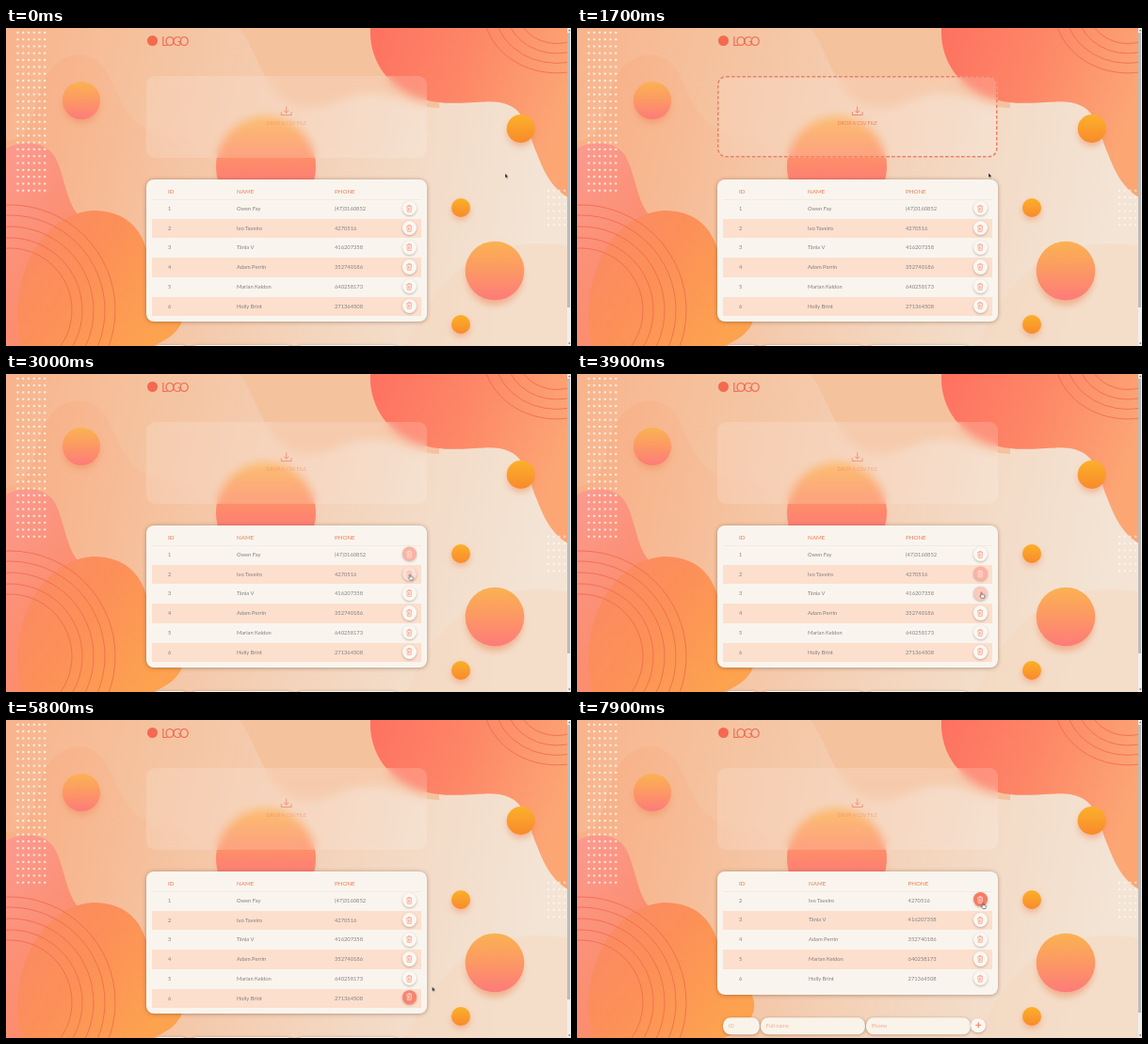
Animation, 600 px wide and 338 px high, one loop 8 s. Source, as an HTML page:

```html
<!DOCTYPE html>
<html lang="en">
<head>
<meta charset="utf-8">
<title>Contact list</title>
<style>
@property --hot { syntax: "<number>"; inherits: true; initial-value: 0; }
html, body { margin: 0; width: 100%; height: 100%; overflow: hidden; }
body {
  position: relative; background: #f3cdb0;
  font: 5.76px/20.7px Lato, sans-serif; color: #858080;
  --gone: 0; animation: gone 8s step-end infinite;
}
body * { position: absolute; box-sizing: border-box; }
svg * { position: static; }
svg { overflow: visible; fill: none; }
.bg { left: 0; top: 0; width: 600px; height: 338px; overflow: hidden; }
span { white-space: nowrap; }

.mark { left: 149.5px; top: 8px; width: 11px; height: 11px; border-radius: 50%; background: #f4694f; }
.logo { left: 165px; top: 3.5px; font-size: 13px; letter-spacing: -2.4px; color: #f0705a; }

.zone {
  left: 149px; top: 51px; width: 297.5px; height: 86.5px; border-radius: 9px;
  background: rgba(255, 250, 245, .17); backdrop-filter: blur(5px);
  color: #f07f66; animation: zone 8s linear infinite;
}
.zone svg { left: 0; top: 0; width: 100%; height: 100%; stroke: currentColor; }
.zone rect { stroke-width: 1.5; stroke-dasharray: 3.7 2; opacity: var(--hot); }
.zone path { opacity: calc(.8 + .2 * var(--hot)); }
.zone span { left: 0; width: 100%; top: 40px; text-align: center; font-size: 5.4px; opacity: calc(.5 + .5 * var(--hot)); }

.card {
  left: 149px; top: 161px; width: 297.5px; height: calc(151.2px - 20.7px * var(--gone));
  border-radius: 8px; background: #f9f5ee;
  box-shadow: 0 .5px 4px rgba(90, 50, 30, .45); overflow: hidden;
}
.line { left: 5.5px; top: 20.5px; width: 286px; height: .5px; background: #f5eae2; }
.head { top: 3px; font-size: 6.2px; color: #f27850; }
.slot { left: 5.5px; width: 286px; height: 20.7px; }
.slot:nth-child(even of .slot) { background: #fcdfcd; }
.row { left: 0; top: 0; }
.leaves { opacity: calc(1 - var(--gone)); }
.rest { left: 0; top: 0; transform: translateY(calc(-20.7px * var(--gone))); }
.id { left: 23px; }
.name { left: 96px; margin-left: calc(1px * var(--gone)); }
.phone { left: 200px; margin-left: calc(2.6px * var(--gone)); }

.btn {
  --lit: min(1, 2 * var(--hot));
  width: 15.2px; height: 15.2px; border-radius: 50%;
  box-shadow: 0 1px 2.5px rgba(90, 60, 45, .35);
  background: rgb(calc(251 - 2 * var(--hot)), calc(247 - 138 * var(--hot)), calc(242 - 158 * var(--hot)));
  color: rgb(calc(246 + 9 * var(--lit)), calc(158 + 75 * var(--lit)), calc(128 + 94 * var(--lit)));
}
.btn svg { left: 4.4px; top: 3.6px; width: 6.4px; height: 8px; stroke: currentColor; stroke-width: .7; }
.slot .btn { left: 266px; top: 2.3px; transform: translateY(calc(-1px * var(--hot))); }

.form { left: 0; top: 336.7px; transform: translateY(calc(-20.7px * var(--gone))); }
.form .btn { left: 418.4px; top: 1px; color: #f1805c; }
.field {
  height: 18px; line-height: 18px; border-radius: 8px; padding-left: 5.8px;
  background: #f9f3ea; color: #f5ad92; box-shadow: 0 .5px 3px rgba(90, 50, 30, .45);
}

.bar { right: 0; top: 0; width: 4.5px; height: 100%; background: #f1efee; }
.thumb { left: .7px; width: 3.1px; top: 5px; height: calc(292px + 14px * var(--gone)); background: #bdbbba; }
.bar svg { left: 0; top: 0; fill: #666; }

.cursor { left: 0; top: 0; animation: move 8s linear infinite, hand 8s step-end infinite; --hand: 0; }
.cursor svg { left: 0; top: 0; width: 6px; height: 8px; }
.arrow { opacity: calc(1 - var(--hand)); fill: #111; stroke: #fff; stroke-width: .4; }
.hand { opacity: var(--hand); fill: #fff; stroke: #222; stroke-width: .55; }

@keyframes gone { 0% { --gone: 0; } 95%, 100% { --gone: 1; } }
@keyframes zone { 0%, 10.6%, 25%, 100% { --hot: 0; } 13.75%, 21.25% { --hot: 1; } }
@keyframes hot1 {
  0%, 28%, 39.4%, 82.5%, 95% { --hot: 0; }
  31%, 35.6%, 86.25%, 94.99%, 100% { --hot: 1; }
  98.75% { --hot: .9; }
}
@keyframes hot2 { 0%, 36.9%, 50.6%, 100% { --hot: 0; } 40.6%, 46.9% { --hot: 1; } }
@keyframes hot3 { 0%, 47.5%, 56.9%, 100% { --hot: 0; } 51.2%, 53.1% { --hot: 1; } }
@keyframes hot4 { 0%, 53.7%, 63.1%, 100% { --hot: 0; } 57.5%, 59.4% { --hot: 1; } }
@keyframes hot5 { 0%, 61.9%, 68.1%, 100% { --hot: 0; } 65% { --hot: 1; } }
@keyframes hot6 { 0%, 65.6%, 75.6%, 100% { --hot: 0; } 68.7%, 71.9% { --hot: 1; } }
@keyframes hand {
  0%, 35.9%, 46.3%, 52.5%, 58%, 64.6%, 71% { --hand: 0; }
  28%, 36.9%, 47.5%, 54%, 61.2%, 66.2%, 82.5%, 100% { --hand: 1; }
}
@keyframes move {
  0%, 1.25% { transform: translate(530px, 154.5px); }
  10% { transform: translate(455px, 130px); }
  13.75%, 16.25% { transform: translate(425px, 112px); }
  21.25% { transform: translate(437px, 154px); }
  27.5% { transform: translate(429px, 184px); }
  33.75% { transform: translate(428.5px, 194px); }
  37.5% { transform: translate(428.5px, 212.5px); }
  45% { transform: translate(429px, 217px); }
  48.1% { transform: translate(429px, 230px); }
  52.5% { transform: translate(429px, 241px); }
  54.4% { transform: translate(429px, 249px); }
  57.5% { transform: translate(429px, 258px); }
  58.75% { transform: translate(429px, 264px); }
  62.5% { transform: translate(429px, 272px); }
  65% { transform: translate(429px, 284px); }
  66.9% { transform: translate(429px, 291px); }
  70% { transform: translate(431px, 297px); }
  71.25% { transform: translate(437px, 293px); }
  72.5% { transform: translate(452.5px, 283.5px); }
  77.5% { transform: translate(452px, 235px); }
  81.25% { transform: translate(437px, 199px); }
  83.75% { transform: translate(429px, 194px); }
  90%, 95% { transform: translate(428.5px, 194.5px); }
  98.75%, 100% { transform: translate(430.5px, 194px); }
}
</style>
</head>
<body>
<svg class="bg" viewBox="0 0 600 338">
  <defs>
    <linearGradient id="base" x2="1" y2=".12">
      <stop stop-color="#f8b48c"/><stop offset=".25" stop-color="#f5c29e"/>
      <stop offset=".5" stop-color="#f4cdb1"/><stop offset=".75" stop-color="#f3dac5"/>
      <stop offset="1" stop-color="#f3e4d5"/>
    </linearGradient>
    <linearGradient id="wave" x2="1" y2=".15">
      <stop stop-color="#f9a679"/><stop offset=".45" stop-color="#f7b791"/>
      <stop offset="1" stop-color="#f4cbae" stop-opacity="0"/>
    </linearGradient>
    <linearGradient id="red" x2="1" y2=".3">
      <stop stop-color="#fe7160"/><stop offset=".5" stop-color="#fd8767"/>
      <stop offset="1" stop-color="#fca674"/>
    </linearGradient>
    <linearGradient id="pink" x2=".7" y2="1">
      <stop stop-color="#fc9a90"/><stop offset=".45" stop-color="#fb9075"/>
      <stop offset="1" stop-color="#fc8a68"/>
    </linearGradient>
    <linearGradient id="amber" x2="1" y2=".6">
      <stop stop-color="#fb8868"/><stop offset=".5" stop-color="#fc9058"/>
      <stop offset="1" stop-color="#fda24f"/>
    </linearGradient>
    <linearGradient id="ball" x2="0" y2="1">
      <stop stop-color="#fbb252"/><stop offset=".5" stop-color="#fc9864"/>
      <stop offset="1" stop-color="#fe7b7a"/>
    </linearGradient>
    <linearGradient id="rose" x2="0" y2="1">
      <stop stop-color="#fbb252"/><stop offset=".55" stop-color="#fe8470"/>
      <stop offset="1" stop-color="#fe7b7a"/>
    </linearGradient>
    <linearGradient id="sun" x2="0" y2="1">
      <stop stop-color="#fbb02a"/><stop offset="1" stop-color="#f98a2c"/>
    </linearGradient>
    <pattern id="dots" x="9.6" y="1.2" width="5.75" height="7.3" patternUnits="userSpaceOnUse">
      <circle cx="2.9" cy="3.6" r="1.15" fill="#fff"/>
    </pattern>
    <filter id="soft" x="-50%" y="-50%" width="200%" height="200%"><feGaussianBlur stdDeviation="3.5"/></filter>
    <clipPath id="redClip"><use href="#redBlob"/></clipPath>
  </defs>
  <rect width="600" height="338" fill="url(#base)"/>
  <path d="M0 120C34 118 26 78 43 50C58 26 86 20 104 42C120 64 122 104 166 113C220 122 236 150 250 190L300 338H0Z" fill="url(#wave)" opacity=".5"/>
  <path d="M248 0C270 30 276 82 318 85C350 86 362 66 395 70C420 74 440 85 460 85V0Z" fill="#f5c29e"/>
  <path d="M425 338C455 270 500 215 600 232V338Z" fill="#f4d5b9" opacity=".4"/>
  <path id="redBlob" d="M387 0C385 34 406 64 440 75C472 85 500 76 524 79C554 84 554 112 564 134C573 158 582 172 600 182V0Z" fill="url(#red)"/>
  <g id="rings" clip-path="url(#redClip)" stroke="#f0684e" stroke-width=".8"></g>
  <path d="M0 128C18 119 43 119 53 139C63 160 64 186 78 200C100 230 100 300 120 338H0Z" fill="url(#pink)"/>
  <path d="M16 338C0 270 35 198 92 194C130 194 146 216 152 246C164 270 186 284 188 300C190 318 176 330 156 338Z" fill="url(#amber)"/>
  <g id="arcs" stroke="#f0684c" stroke-width=".8"></g>
  <rect x="9.6" y="1.2" width="34.5" height="175.2" fill="url(#dots)" opacity=".85"/>
  <rect x="572.9" y="169.1" width="23" height="43.8" fill="url(#dots)" opacity=".65"/>
  <g id="balls"></g>
</svg>

<i class="mark"></i><span class="logo">LOGO</span>

<div class="zone">
  <svg>
    <rect x=".75" y=".75" width="296" height="85" rx="8.5"/>
    <path d="M148.7 32.5v6.6m-2.6-2.5l2.6 2.6l2.6-2.6M143.3 38.3v3.2h10.8v-3.2" stroke-width=".9"/>
  </svg>
  <span>DROP A CSV FILE</span>
</div>

<div class="card" id="card">
  <span class="head id">ID</span><span class="head name">NAME</span><span class="head phone">PHONE</span>
  <i class="line"></i>
</div>

<div class="form">
  <div class="field" style="left:155px;width:38.5px">ID</div>
  <div class="field" style="left:195px;width:110.5px">Full name</div>
  <div class="field" style="left:307px;width:110.5px">Phone</div>
  <div class="btn"><svg viewBox="0 0 6.4 8"><path d="M3.2 1v6M.2 4h6" stroke-width="1.1"/></svg></div>
</div>

<div class="bar">
  <i class="thumb"></i>
  <svg width="4" height="338"><path d="M1 3.2l1.2-1.6l1.2 1.6zM1 334.6l1.2 1.6l1.2-1.6z"/></svg>
</div>

<div class="cursor">
  <svg class="arrow" viewBox="0 0 6 8"><path d="M0 0V5l1.2-1l.8 1.8l.9-.4l-.8-1.7h1.6z"/></svg>
  <svg class="hand" viewBox="0 0 6 8"><path d="M0 .8Q.5 0 1 .8V2.9Q1.6 2.3 2 3Q2.6 2.5 3 3.2Q3.9 3 3.9 4V5.2L3.3 6.6H.6L-1 4.5Q-.9 3.6 0 4.3Z"/></svg>
</div>

<script>
const $ = id => document.getElementById(id);
const PITCH = 20.7, TOP = 21;

const people = [
  ["Owen Fay", "(47)3160852"], ["Ivo Taveiro", "4270516"], ["Tânia V", "416207358"],
  ["Adam Perrin", "352740186"], ["Marian Keldon", "640258173"], ["Holly Brint", "271364508"]
];
const trash = `<svg viewBox="0 0 6.4 8"><path d="M.3 1.7h5.8M2.1 1.6V.5h2.2v1.1M.9 1.8l.4 5.6h3.8l.4-5.6M2.5 3v3.2M3.9 3v3.2"/></svg>`;

// Slots keep stripes and buttons in place; the text rows move up over them.
const box = (kind, i, inner) => `<div class="${kind}" style="top:${TOP + i * PITCH}px">${inner}</div>`;
const slots = people.map((_, i) => box(i === people.length - 1 ? "slot leaves" : "slot", i,
  `<div class="btn" style="animation:hot${i + 1} 8s linear infinite">${trash}</div>`));
const rows = people.map(([name, phone], i) => box(i ? "row" : "row leaves", i,
  `<span class="id">${i + 1}</span><span class="name">${name}</span><span class="phone">${phone}</span>`));
$("card").insertAdjacentHTML("beforeend",
  slots.join("") + rows[0] + `<div class="rest">${rows.slice(1).join("")}</div>`);

const each = (list, draw) => list.map(draw).join("");
$("rings").innerHTML = each([42, 54, 66, 78], r => `<ellipse cx="585" cy="-20" rx="${r}" ry="${r * .87}"/>`);
$("arcs").innerHTML = each([66, 77, 89, 101, 112], r => `<circle cx="4" cy="300" r="${r}"/>`);
$("balls").innerHTML = each([
  [80, 77, 20, "ball"], [276, 147, 53, "rose"], [546.7, 107, 15, "sun"],
  [483, 191, 10, "sun"], [519, 258, 31.3, "ball"], [483, 315, 10, "sun"]
], ([x, y, r, fill]) =>
  `<circle cx="${x}" cy="${y + 2 + r * .15}" r="${r * .95}" fill="#ee8a5c" opacity=".55" filter="url(#soft)"/>
   <circle cx="${x}" cy="${y}" r="${r}" fill="url(#${fill})"/>`);
</script>
</body>
</html>
```
